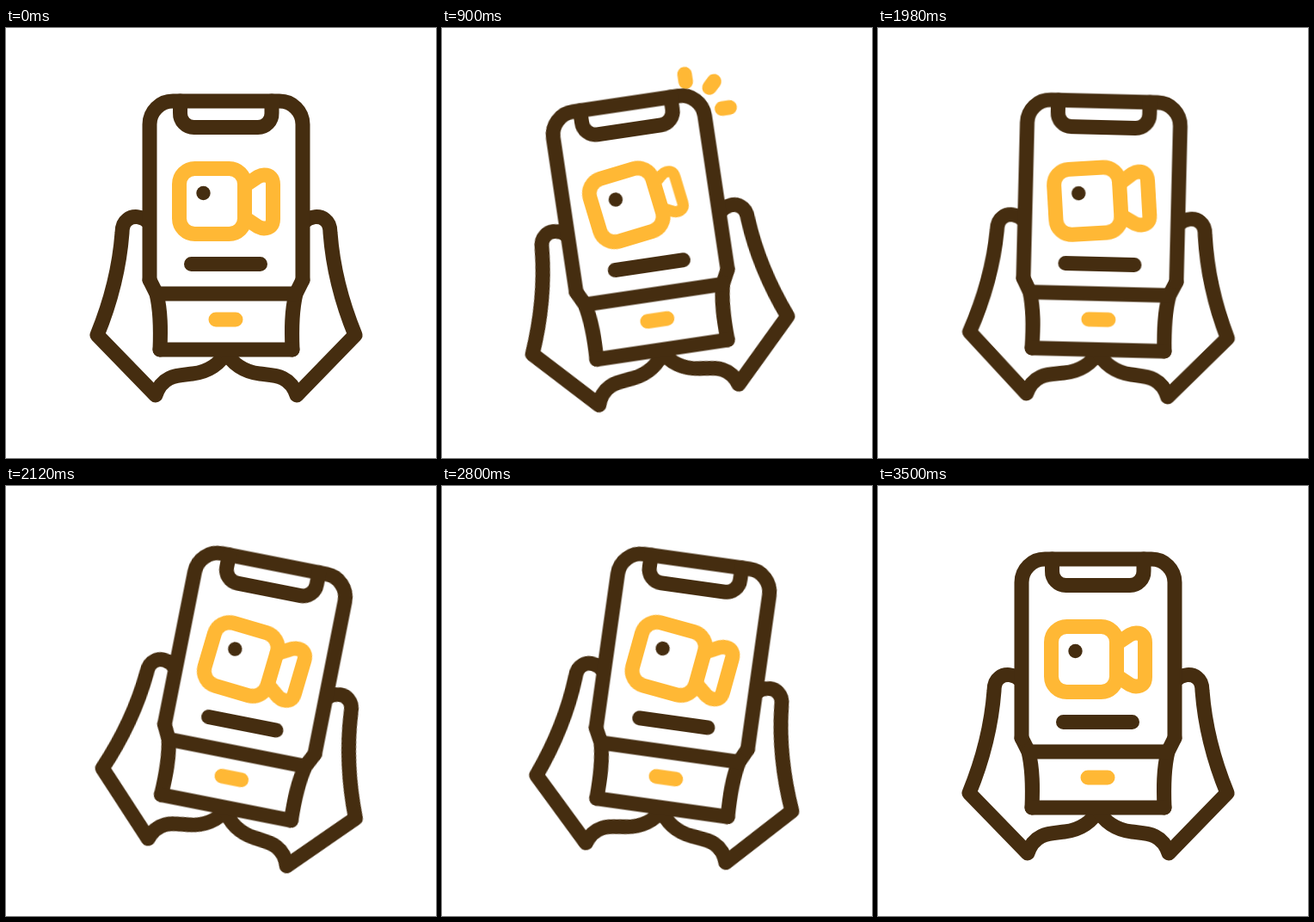
Recreate the animation shown at these times as an HTML page without scripts. Size 500x500 px, loop 3620 ms.

```html
<!DOCTYPE html>
<html lang="en">
<head>
<meta charset="utf-8">
<title>Video call in hand</title>
<style>
  html, body { margin: 0; width: 100%; height: 100%; overflow: hidden; background: #fff; }
  svg { display: block; width: 100vw; height: 100vh; }

  .line { fill: none; stroke-width: 17; stroke-linecap: round; stroke-linejoin: round; }
  .dark { stroke: #452d10; }
  .gold { stroke: #ffb835; }

  .device, .camera, .lens { animation: 3620ms ease-in-out infinite; }
  .device { transform-origin: 256px 374px; animation-name: tilt; }
  .camera { transform-origin: 239.5px 201.5px; animation-name: follow; }
  .lens { transform-origin: 278px 202px; animation-name: squeeze; }
  .sparks {
    stroke-dasharray: 0 99;
    animation: shoot 3620ms linear infinite, blink 3620ms step-end infinite;
  }

  @keyframes tilt {
    0%, 5.53% { transform: rotate(0deg); }
    17.96% { transform: rotate(-12deg); }
    27.07%, 49.72% { transform: rotate(-8deg); }
    60.08% { transform: rotate(12deg); }
    67.27%, 85.64% { transform: rotate(8deg); }
    96.69%, 100% { transform: rotate(0deg); }
  }
  /* The camera swings with a slight delay behind the phone. */
  @keyframes follow {
    0%, 6.91% { transform: rotate(0deg); }
    19.34% { transform: rotate(-11deg); }
    27.62%, 51.66% { transform: rotate(-7.5deg); }
    62.98% { transform: rotate(11deg); }
    70.17%, 85.91% { transform: rotate(7.5deg); }
    96.69%, 100% { transform: rotate(0deg); }
  }
  @keyframes squeeze {
    0%, 19.06% { transform: scale(1); }
    25.41% { transform: scale(.77); }
    32.6%, 62.7% { transform: scale(1); }
    69.61% { transform: scale(.77); }
    76.8%, 100% { transform: scale(1); }
  }
  @keyframes shoot {
    0%, 20.72% { stroke-dasharray: 0 99; stroke-dashoffset: 0; }
    24.86% { stroke-dasharray: 9 99; stroke-dashoffset: 0; }
    29.28% { stroke-dasharray: 11 99; stroke-dashoffset: -11; }
    33.01% { stroke-dasharray: 0 99; stroke-dashoffset: -22; }
    33.02%, 64.92% { stroke-dasharray: 0 99; stroke-dashoffset: 0; }
    69.06% { stroke-dasharray: 9 99; stroke-dashoffset: 0; }
    73.48% { stroke-dasharray: 11 99; stroke-dashoffset: -11; }
    77.21%, 100% { stroke-dasharray: 0 99; stroke-dashoffset: -22; }
  }
  @keyframes blink {
    0%, 33.01%, 77.21%, 100% { opacity: 0; }
    20.8%, 65% { opacity: 1; }
  }
</style>
</head>
<body>
<svg viewBox="0 0 500 500" aria-label="Hands holding a phone on a video call">
  <defs>
    <g id="hand">
      <path d="M166 226C158 218 147 218 141 223C137 226 135 231 135 238C132 278 122 318 106 357L174 427C182 402 203 404 217 402C235 400 250 390 256 376"/>
      <path d="M167 293L175 309C180 330 180 350 179 374"/>
    </g>
  </defs>

  <g class="device line dark">
    <g class="sparks gold">
      <path d="M329 70V48"/>
      <path d="M355.2 80.8L370.7 65.3"/>
      <path d="M366 107H388"/>
    </g>

    <use href="#hand"/>
    <use href="#hand" transform="matrix(-1 0 0 1 512 0)"/>
    <path d="M167 293V112A27 27 0 0 1 194 85H318A27 27 0 0 1 345 112V293"/>
    <path d="M202.5 85V99A16 16 0 0 0 218.500 115.500H293A16 16 0 0 0 309 99V85"/>
    <path d="M175 309H337M179 374H333M215.500 274.500H295.500"/>
    <path class="gold" d="M244 339H267"/>

    <g class="camera gold">
      <path class="lens" d="M278 183L293 173Q297 171 300 171Q310.500 171 310.500 182V222Q310.500 233 300 233Q297 233 293 231L278 221"/>
      <rect x="201.500" y="163.500" width="76" height="76" rx="18"/>
      <circle cx="229.500" cy="192" r="8.200" fill="#452d10" stroke="none"/>
    </g>
  </g>
</svg>
</body>
</html>
```
